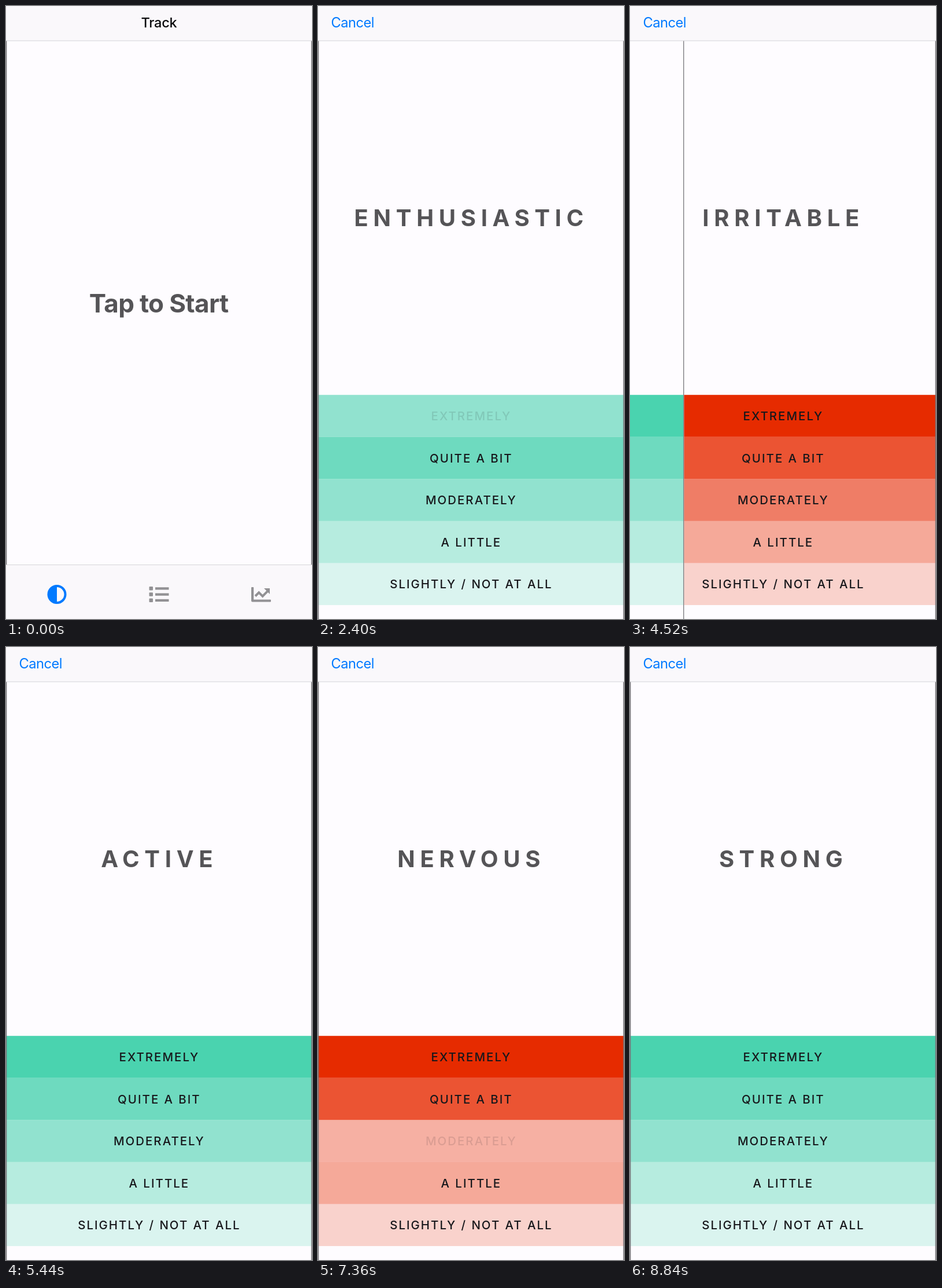
Write an HTML page that moves like this. It is 529 by 1058 pixels and loops after 8880 ms.

```html
<!DOCTYPE html>
<html lang="en">
<head>
<meta charset="utf-8">
<title>Track</title>
<style>
  html, body { margin: 0; width: 100%; height: 100%; overflow: hidden; background: #fefcff; }
  svg { display: block; width: 529px; height: 1058px; font-family: Inter, Roboto, sans-serif; }
  .word { font-size: 40px; font-weight: 700; letter-spacing: 8.7px; fill: #555457; }
  .start { font-size: 44px; font-weight: 700; letter-spacing: -.65px; fill: #555457; }
  .label { font-size: 20.4px; font-weight: 550; letter-spacing: 2.05px; word-spacing: .8px; fill: #17171b; }
  .word, .start, .label, .title { text-anchor: middle; }
  .title { font-size: 23.5px; font-weight: 500; letter-spacing: -.2px; fill: #0b0b0d; }
  .cancel { font-size: 23.7px; letter-spacing: -.55px; fill: #007aff; }
  .bar { fill: #faf8fb; }
  .rule { fill: #d6d5d9; }
  .edge { fill: #77767a; }
  .icon { fill: #929194; }
</style>
</head>
<body>
<svg viewBox="0 0 529 1058">
  <g id="deck"></g>
  <rect class="bar" width="529" height="60"/>
  <rect class="rule" y="59.5" width="529" height="1"/>
  <text id="cancel" class="cancel" x="22.5" y="37.2">Cancel</text>
  <g id="home">
    <text class="title" x="264.5" y="37.2">Track</text>
    <rect class="bar" y="964" width="529" height="94"/>
    <rect class="rule" y="964" width="529" height="1"/>
    <circle cx="88" cy="1015.5" r="14.5" fill="none" stroke="#007aff" stroke-width="4"/>
    <path d="M88 1001a14.5 14.5 0 0 0 0 29z" fill="#007aff"/>
    <g class="icon">
      <path d="M258 1003.3h23.5v4.2H258zM258 1013.5h23.5v4.2H258zM258 1023.8h23.5v4.2H258z"/>
      <rect x="247.5" y="1002" width="6.5" height="6.5" rx="1"/>
      <rect x="247.5" y="1012.3" width="6.5" height="6.5" rx="1"/>
      <rect x="247.5" y="1022.5" width="6.5" height="6.5" rx="1"/>
      <path d="M424 1004q0-1 1-1h2.2q1 0 1 1v20.5H457q1 0 1 1v2q0 1-1 1H426q-2 0-2-2z"/>
      <path d="M446 1005h10v10z"/>
    </g>
    <path d="M431 1018.5l6.2-6.2 6.4 6.3 9-9" fill="none" stroke="#929194" stroke-width="4"/>
  </g>
</svg>
<script>
const LOOP = 8880, SLIDE = 340, FADE = 350, WIDTH = 529;
const TOP = 671.2, ROW = 72.55;
const GREEN = '#4ad3af', RED = '#e62b00';
const ROWS = ['EXTREMELY', 'QUITE A BIT', 'MODERATELY', 'A LITTLE', 'SLIGHTLY / NOT AT ALL'];

// word, colour, press time, slide time, pressed row
const CARDS = [
  ['Tap to Start', null, 1315, 1400, 0],
  ['DETERMINED', GREEN, 1800, 1880, 2],
  ['ENTHUSIASTIC', GREEN, 2395, 2500, 0],
  ['INSPIRED', GREEN, 2840, 2900, 1],
  ['ASHAMED', RED, 3320, 3518, 3],
  ['ALERT', GREEN, 3860, 3920, 1],
  ['PROUD', GREEN, 4240, 4272, 2],
  ['IRRITABLE', RED, 4960, 5060, 3],
  ['ACTIVE', GREEN, 6120, 6240, 4],
  ['GUILTY', RED, 6840, 6940, 0],
  ['NERVOUS', RED, 7340, 7460, 2],
  ['INTERESTED', GREEN, 7920, 8040, 1],
  ['STRONG', GREEN, Infinity, Infinity, 0]
];

const deck = document.getElementById('deck');
const home = document.getElementById('home');
const cancel = document.getElementById('cancel');

function add(parent, tag, attrs, text = '') {
  const el = document.createElementNS('http://www.w3.org/2000/svg', tag);
  for (const key in attrs) el.setAttribute(key, attrs[key]);
  el.textContent = text;
  return parent.appendChild(el);
}

function buildCard([word, color, press, slide, row]) {
  const g = add(deck, 'g', {});
  add(g, 'rect', { y: 60, width: WIDTH, height: 998, fill: '#fefcff' });
  const card = { g, press, slide };
  if (color) {
    add(g, 'text', { class: 'word', x: 265.2, y: 380 }, word);
    ROWS.forEach((name, i) => {
      const alpha = 1 - i * 0.2;
      const y = TOP + i * ROW;
      const fill = add(g, 'rect', {
        x: 1, y, width: 527, height: ROW, fill: color, 'fill-opacity': alpha
      });
      const label = add(g, 'text', { class: 'label', x: 264.9, y: y + 43.8 }, name);
      if (i === row) Object.assign(card, { fill, label, alpha });
    });
  } else {
    card.label = add(g, 'text', { class: 'start', x: 264.2, y: 528.6 }, word);
  }
  for (const x of [0, 527.7]) add(g, 'rect', { class: 'edge', x, y: 60, width: 1.3, height: 998 });
  return card;
}

// Later cards lie underneath, so they are added first.
const cards = CARDS.slice().reverse().map(buildCard);

const clamp = v => Math.min(1, Math.max(0, v));
const smooth = p => p * p * (3 - 2 * p);

function draw() {
  const t = performance.now() % LOOP;
  for (const { g, press, slide, fill, label, alpha } of cards) {
    const p = clamp((t - slide) / SLIDE);
    g.setAttribute('transform', `translate(${-WIDTH * smooth(p)} 0)`);
    g.style.display = p < 1 ? '' : 'none';
    const held = t >= press && t < slide;
    label.style.opacity = t < press ? 1 : 0.12 + 0.88 * clamp((t - slide) / FADE);
    if (fill) fill.setAttribute('fill-opacity', held ? alpha * 0.6 : alpha);
  }
  const started = t >= CARDS[0][3];
  home.style.display = started ? 'none' : '';
  cancel.style.display = started ? '' : 'none';
  requestAnimationFrame(draw);
}
draw();
</script>
</body>
</html>
```
